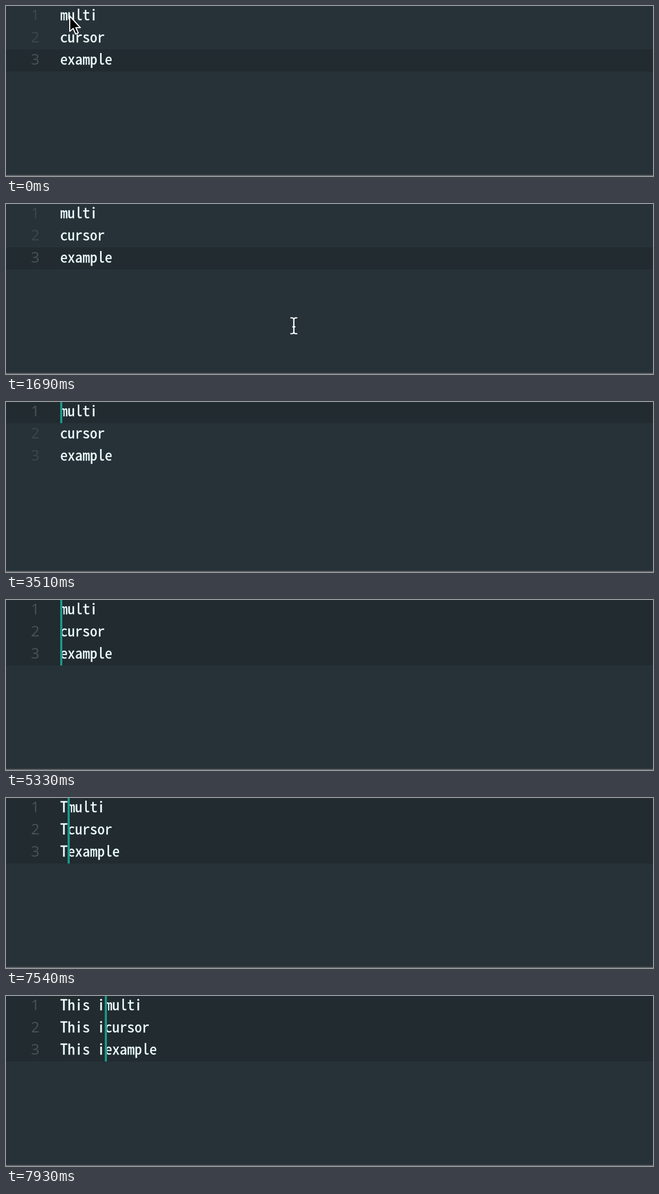
Recreate the animation shown at these times as an HTML page. Size 1218 px wide and 322 px high, loop 8000 ms.

```html
<!DOCTYPE html>
<html lang="en">
<head>
<meta charset="utf-8">
<title>Multi cursor</title>
<style>
  html, body { margin: 0; width: 100%; height: 100%; overflow: hidden; background: #273238; }
  svg { display: block; width: 1218px; height: 322px; }
  .code {
    font: 28px "Noto Sans Mono CJK JP", "Noto Sans Mono CJK KR", "Noto Sans Mono CJK SC", "Noto Sans Mono", monospace;
    fill: #eeffff; stroke: #eeffff; stroke-width: .4px; white-space: pre;
  }
  .number { font: 28px "Noto Sans", "Open Sans", sans-serif; fill: #3a464b; text-anchor: middle; }
  .number.active { fill: #465155; }
  .active-line { fill: #212b30; }
  .caret { fill: #1a9988; }
</style>
</head>
<body>
<svg viewBox="0 0 1218 322">
  <g id="rows"></g>
  <rect y="320" width="1218" height="2" fill="#5d6365"/>
  <path id="arrow" d="M1 2V31L7.5 25.5L12 36L17 34L12.5 24H21Z"
        fill="#000" stroke="#fff" stroke-width="2" stroke-linejoin="round"/>
  <path id="beam" d="M-6.5-15h2.5Q0-15 0-11Q0-15 4-15h2.5M0-11V11M-6.5 15h2.5Q0 15 0 11Q0 15 4 15h2.5M-3 2H3"
        fill="none" stroke="#fff" stroke-width="2.4"/>
</svg>
<script>
const LOOP = 8000, STEP = 130;
const LEFT = 102, ADVANCE = 14, LINE = 42;
const words = ["multi", "cursor", "example"];

// [time, value]: each value holds until the next entry
const typed = [[0, ""], [7540, "T"], [7670, "Th"], [7800, "This"], [7930, "This i"]];
const activeLines = [[0, [2]], [3250, [0]], [4030, [0, 1]], [4290, [0, 1, 2]]];
const caretOn = [
  [0, false], [1040, true], [1430, false], [1820, true], [2210, false], [2600, true],
  [3120, false], [3250, true], [4940, false], [5330, true], [5850, false], [6240, true],
  [6630, false], [7020, true], [7410, false], [7540, true]
];
const pointer = [[0, "arrow"], [1040, "beam"], [3510, "none"]];

// [time, x, y]: positions in between are eased
const path = [
  [0, 119, 17], [390, 100, 8], [1039, 100, 8], [1040, 103, 14], [1820, 577, 248],
  [2340, 419, 80], [2470, 419, 80], [2860, 170, 88], [2990, 170, 88], [3380, 103, 16]
];

const $ = id => document.getElementById(id);

function add(parent, tag, attributes) {
  const node = document.createElementNS("http://www.w3.org/2000/svg", tag);
  for (const key in attributes) node.setAttribute(key, attributes[key]);
  return parent.appendChild(node);
}

const show = (node, visible) => node.setAttribute("visibility", visible ? "visible" : "hidden");
const valueAt = (table, t) => table.filter(([time]) => time <= t).pop()[1];

function positionAt(t) {
  const next = path.findIndex(([time]) => time > t);
  if (next < 0) return path[path.length - 1].slice(1);
  const [t0, x0, y0] = path[next - 1], [t1, x1, y1] = path[next];
  const u = (t - t0) / (t1 - t0), k = u * u * (3 - 2 * u);
  return [x0 + (x1 - x0) * k, y0 + (y1 - y0) * k];
}

const rows = words.map((word, i) => {
  const top = i * LINE - 2, group = $("rows");
  const band = add(group, "rect", { class: "active-line", y: top, width: 1218, height: LINE });
  const number = add(group, "text", { class: "number", x: 55, y: top + 29 });
  number.textContent = i + 1;
  const code = add(group, "text", { class: "code", x: LEFT, y: top + 29 });
  const caret = add(group, "rect", { class: "caret", y: top, width: 4, height: LINE });
  return { word, band, number, code, caret };
});

// Keep the character grid independent of the font that is available.
const measure = document.createElement("canvas").getContext("2d");
measure.font = getComputedStyle(rows[0].code).font;
const spacing = ADVANCE - measure.measureText("m").width;
rows.forEach(row => row.code.style.letterSpacing = spacing + "px");

function render(now) {
  const t = Math.floor((now % LOOP) / STEP) * STEP;
  const prefix = valueAt(typed, t), lines = valueAt(activeLines, t), lit = valueAt(caretOn, t);
  rows.forEach((row, i) => {
    const active = lines.includes(i);
    const text = prefix + row.word;
    const column = i === 2 && t < 3250 ? text.length : prefix.length;
    if (row.code.textContent !== text) row.code.textContent = text;
    row.number.classList.toggle("active", active);
    row.caret.setAttribute("x", LEFT + column * ADVANCE);
    show(row.band, active);
    show(row.caret, active && lit);
  });
  const kind = valueAt(pointer, t), [x, y] = positionAt(t);
  for (const id of ["arrow", "beam"]) {
    show($(id), id === kind);
    $(id).setAttribute("transform", `translate(${x} ${y})`);
  }
}

const start = performance.now();
function tick() {
  render(performance.now() - start);
  requestAnimationFrame(tick);
}
tick();
</script>
</body>
</html>
```
